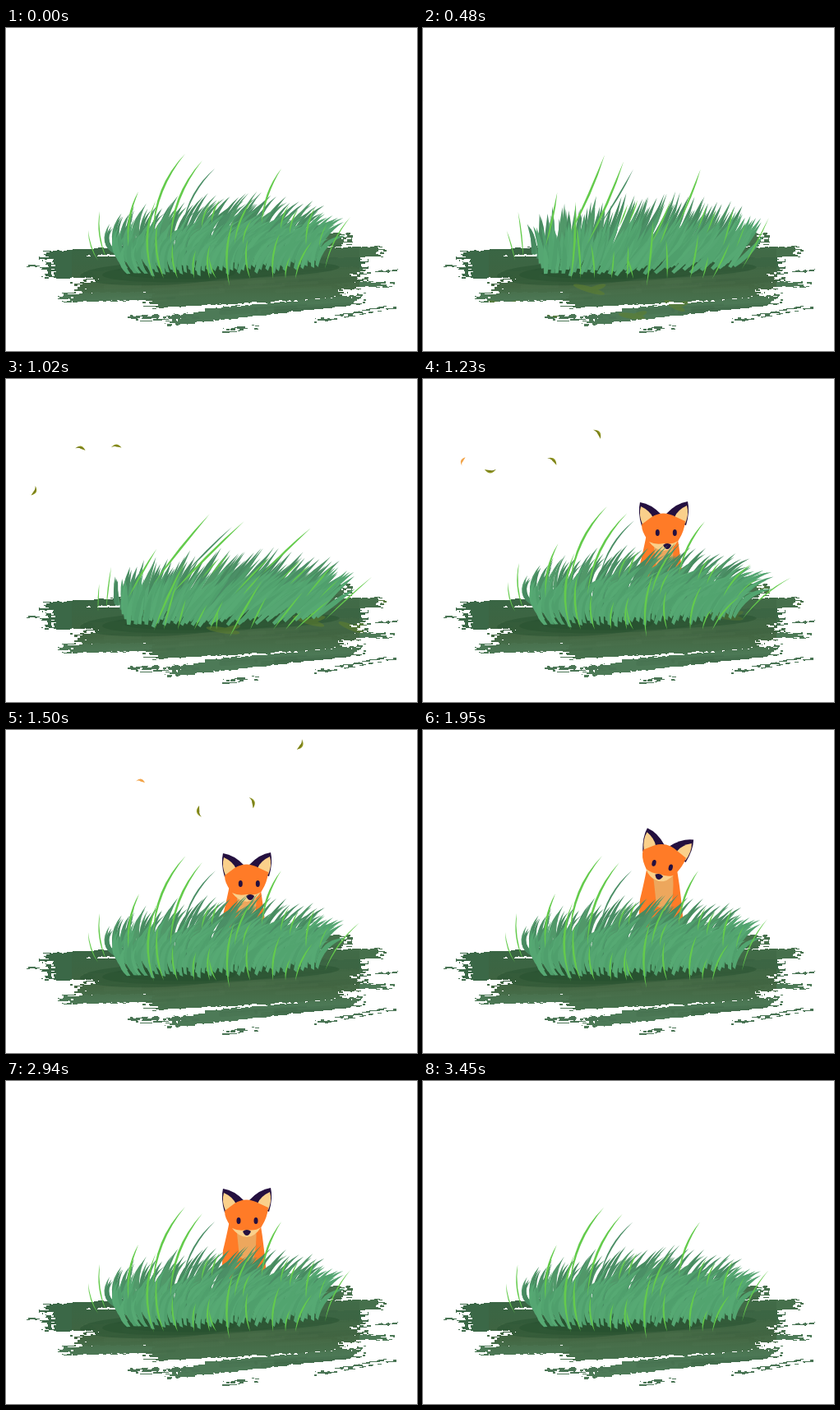
Write an HTML page with a canvas that moves like this. It is 500x393 px and loops after 3.51 s.

```html
<!DOCTYPE html>
<html lang="en">
<head>
<meta charset="utf-8">
<title>Fox in the grass</title>
<style>
html, body { margin: 0; width: 100%; height: 100%; overflow: hidden; background: #fff; }
canvas { display: block; width: 500px; height: 393px; }
</style>
</head>
<body>
<canvas id="stage" width="500" height="393"></canvas>
<script>
const LOOP = 3510, STEP = 30;
const stage = document.getElementById('stage');
const ctx = stage.getContext('2d');

const lerp = (a, b, u) => a + (b - a) * u;
const clamp = (v, a = 0, b = 1) => Math.min(b, Math.max(a, v));
const ramp = (t, a, b) => { const u = clamp((t - a) / (b - a)); return u * u * (3 - 2 * u); };
const pulse = (t, a, b, c, d) => ramp(t, a, b) * (1 - ramp(t, c, d));

let seed = 7;
function rnd() {
  seed = (seed * 16807) % 2147483647;
  return seed / 2147483647;
}

// Ground: dry brush strokes, painted once

function hash(x, y) {
  const v = Math.sin(x * 127.1 + y * 311.7) * 43758.5453;
  return v - Math.floor(v);
}

function grain(x, y) {
  const i = Math.floor(x), j = Math.floor(y), u = x - i;
  return lerp(hash(i, j), hash(i + 1, j), u);
}

function dryStroke(g, color, cover, x0, y0, x1, y1, half) {
  g.fillStyle = color;
  for (let x = x0; x <= x1; x++) {
    const mid = lerp(y0, y1, (x - x0) / (x1 - x0));
    const ends = Math.min(x - x0, x1 - x) / 26 + 0.2;
    for (let y = Math.round(mid - half); y <= mid + half; y++) {
      const side = (half - Math.abs(y - mid)) / 2.6 + 0.2;
      if (grain(x / 4, y / 1.5) < Math.min(ends, side, cover)) g.fillRect(x, y, 1, 1);
    }
  }
}

function paintGround() {
  const c = document.createElement('canvas');
  c.width = 500; c.height = 393;
  const g = c.getContext('2d');
  const wet = (color, ...s) => dryStroke(g, color, 2, ...s);
  const dry = (...s) => dryStroke(g, '#4a7555', .52, ...s);
  const dark = '#3b6847', mid = '#46704c', pale = '#4d7a57';

  wet(dark, 40, 276, 190, 267, 5);
  wet(dark, 42, 287, 440, 284, 10);
  wet(dark, 43, 299, 432, 297, 6);
  wet(mid, 360, 258, 423, 257, 9);
  wet(mid, 340, 274, 462, 271, 7);
  wet(mid, 78, 316, 440, 310, 8);
  wet(mid, 92, 306, 436, 300, 11);
  wet(pale, 380, 313, 472, 311, 4);
  wet(pale, 63, 328, 240, 324, 6);
  wet(mid, 165, 331, 415, 317, 11);
  wet(pale, 193, 356, 437, 329, 7);
  wet(pale, 230, 347, 400, 333, 6);
  dry(25, 289, 50, 290, 2);
  dry(424, 298, 479, 295, 2);
  dry(148, 353, 235, 350, 4);
  dry(263, 368, 307, 363, 3);
  dry(375, 356, 474, 338, 3);

  g.globalCompositeOperation = 'source-atop';
  const tint = g.createLinearGradient(0, 265, 0, 345);
  tint.addColorStop(0, 'rgba(56,98,64,.35)');
  tint.addColorStop(.6, 'rgba(66,98,62,.7)');
  tint.addColorStop(1, 'rgba(77,122,87,0)');
  g.fillStyle = tint;
  g.fillRect(80, 262, 350, 85);
  g.lineCap = 'round';
  for (let i = 0; i < 40; i++) {
    const x = lerp(90, 360, rnd()), y = lerp(280, 352, rnd()), w = lerp(40, 110, rnd());
    g.strokeStyle = i % 2 ? 'rgba(46,84,52,.13)' : 'rgba(88,128,92,.1)';
    g.lineWidth = lerp(2, 6, rnd());
    g.beginPath();
    g.moveTo(x, y);
    g.lineTo(x + w, y - w * .06);
    g.stroke();
  }
  g.fillStyle = 'rgba(34,76,42,.42)';
  for (let i = 0; i < 3; i++) {
    g.beginPath();
    g.ellipse(185 + 45 * i, 299 - 2 * i, 95 + 18 * i, 14 - 2 * i, -.03, 0, 7);
    g.fill();
  }
  return c;
}

// Leaf shadows slide over the painted ground only

const shades = Array.from({ length: 9 }, (_, i) => ({
  x: 306 - i * 52,
  y: 338 + 18 * Math.sin(i * 2.3) - i,
  r: lerp(14, 22, rnd()),
  turn: lerp(.05, .5, rnd())
}));

function drawShades(t) {
  const alpha = pulse(t, 90, 460, 950, 1650) * .55;
  if (!alpha) return;
  ctx.save();
  ctx.globalCompositeOperation = 'source-atop';
  ctx.globalAlpha = alpha;
  ctx.fillStyle = '#5f7f2b';
  for (const s of shades) {
    const x = s.x + (t - 480) * .5, y = s.y - (t - 480) * .08;
    ctx.beginPath();
    ctx.ellipse(x, y, s.r, 3.5, s.turn, 0, 7);
    ctx.ellipse(x + 9, y - 2, s.r * .6, 3, -.3, 0, 7);
    ctx.fill();
  }
  ctx.restore();
}

// Grass: lens-shaped blades; wind moves the tip and straightens the curve

const blade = (x, y, tx, ty, bow, w, color, push, foot = 0) =>
  ({ x, y, tx, ty, bow, w, color, push, foot, h: y - ty, phase: rnd() * 6 });

function tuft() {
  const blades = [];
  const back = ['#4b8f66', '#519869', '#478a60'];
  const front = ['#52a46f', '#56a973', '#4f9f6c', '#55a672'];
  const lean = u => lerp(-13, 26, clamp(u * 2.2)) + rnd() * 12;
  for (let i = 0; i < 95; i++) {
    const u = (i * .618034) % 1, x = lerp(134, 368, u);
    const top = 231 - 35 * Math.sin(Math.PI * (u * .8 + .1)) + rnd() * 24;
    blades.push(blade(x, 274 + rnd() * 8, x + lean(u), top, 9 + rnd() * 4,
      2.7 + rnd() * 1.6, back[i % 3], .3, 2));
  }
  for (let i = 0; i < 150; i++) {
    const u = (i * .618034 + .3) % 1, x = lerp(143, 380, u);
    const y = lerp(276, 299, i / 150) - 8 * u * u + rnd() * 4;
    blades.push(blade(x, y, x + lean(u), y - 34 - rnd() * 24, 8 + rnd() * 4,
      3 + rnd() * 1.7, front[i % 4], .3, 2.2));
  }
  blades.push(blade(215, 240, 254, 171, 8, 1.8, '#4b8f66', .4));
  return blades;
}

function brightBlade(x, y, tx, ty, push = .5) {
  const h = y - ty;
  const w = clamp(1.2 + h / 70, 1.4, 2.5) * (x < 130 || x > 380 ? .65 : 1);
  return blade(x, y, tx, ty, h * .09 + (h > 90 ? 3 : 0), w, '#64cb4c', push);
}

// long blades carry both ends; short ones share a foot line or a height
const long = [
  [112, 283, 100, 246, .65], [122, 280, 114, 223, .42], [149, 266, 161, 199],
  [179, 250, 218, 153, .45], [180, 306, 182, 210], [200, 263, 239, 161, .72],
  [272, 314, 277, 233], [278, 262, 300, 208], [311, 238, 335, 171, .58],
  [365, 265, 376, 218], [388, 293, 419, 230, .41]
];
const low = [
  [192, 184, 238], [209, 203, 262], [229, 231, 270], [248, 248, 264], [256, 247, 278],
  [297, 294, 257], [325, 333, 250], [340, 346, 278], [352, 372, 260]
];
const high = [[238, 214], [250, 209], [288, 234], [334, 216], [345, 221], [381, 238]];
const bright = [
  ...long.map(p => brightBlade(...p)),
  ...low.map(([x, tx, ty]) => brightBlade(x, 305, tx, ty)),
  ...high.map(([x, ty]) => brightBlade(x, ty + 29, x + 10, ty))
];

function wind(t, x, phase) {
  const d = Math.max(0, x - 100);
  const late = 330 * Math.pow(d / 285, 8) + d * .3;
  const gust = pulse(t, 470 + d * .15, 720 + d * .1, 890 + late, 1180 + late);
  const lead = .07 * pulse(t, 60, 420, 500, 700);
  const flutter = .045 * Math.sin(t / 75 + phase) * pulse(t, 480, 650, 1300, 1750);
  const after = .1 * pulse(t, 1000, 1200, 1250, 1600);
  const idle = t > 1950 && t < 2940 ? .04 * Math.sin(Math.PI * (t - 1950) / 495) ** 2 : 0;
  const rustle = .05 * pulse(t, 3200, 3400, 3455, 3510);
  return gust + lead + flutter + after + idle + rustle;
}

function drawBlade(b, t) {
  const k = wind(t, b.x, b.phase);
  const flat = pulse(t, 200, 480, 920, 1200);
  const tx = b.tx + k * b.push * b.h, ty = b.ty + k * .17 * b.h * (b.foot ? .5 : 1);
  const len = Math.hypot(tx - b.x, ty - b.y);
  const nx = (ty - b.y) / len, ny = -(tx - b.x) / len;
  const bow = 1.6 * b.bow * lerp(1, -.2, flat);
  const cx = (b.x + tx) / 2 + nx * bow, cy = (b.y + ty) / 2 + ny * bow;
  const wx = nx * b.w * 1.1, wy = ny * b.w * 1.1, fx = nx * b.foot, fy = ny * b.foot;
  ctx.fillStyle = b.color;
  ctx.beginPath();
  ctx.moveTo(b.x + fx, b.y + fy);
  ctx.quadraticCurveTo(cx + wx, cy + wy, tx, ty);
  ctx.quadraticCurveTo(cx - wx, cy - wy, b.x - fx, b.y - fy);
  ctx.fill();
}

// Fox

const ORANGE = '#ff7b27', CREAM = '#fad08b', INK = '#24103f';

function shape(color, d) {
  ctx.fillStyle = color;
  ctx.fill(new Path2D(d));
}

function dot(x, y, rx, ry) {
  ctx.fillStyle = INK;
  ctx.beginPath();
  ctx.ellipse(x, y, rx, ry, 0, 0, 7);
  ctx.fill();
}

function ear() {
  shape(INK, 'M264 131 Q278 133 290 146 L280 155 L266 160 Q261 143 264 131 Z');
  shape(CREAM, 'M265 136 Q276 141 280 150 L267 158 Q262 146 265 136 Z');
}

function drawFox(t) {
  const up = ramp(t, 1070, 1200), rise = ramp(t, 1660, 1820), duck = ramp(t, 3060, 3290);
  if (!up || duck === 1) return;
  const tilt = pulse(t, 1760, 1900, 2690, 2870);
  const drop = lerp(95, 19, up) - 19 * rise + 95 * duck;
  const look = 1 - ramp(t, 1640, 1800);

  ctx.save();
  ctx.beginPath();
  ctx.rect(240, 90, 100, 162);
  ctx.clip();
  ctx.translate(0, drop);
  shape(ORANGE, 'M272 170 Q268 190 264 206 L261 252 L318 252 Q315 205 309 170 Z');
  shape('#eda75d', 'M280 176 L304 176 Q306 200 300 222 L284 214 Z');

  ctx.translate(293 - 6 * tilt, 184 - 6 * tilt);
  ctx.rotate(tilt * .265);
  ctx.translate(-293, -184);
  ear();
  ctx.save();
  ctx.translate(586, -1);
  ctx.scale(-1, 1);
  ear();
  ctx.restore();
  shape(ORANGE, 'M266 158 L278 149 Q292 140 308 149 L319 154 Q318 166 311 177 Q303 190 293 190 Q281 188 273 176 Q266 167 266 158 Z');
  shape(CREAM, 'M275 179 Q283 183 293 181 Q303 183 310 178 Q303 190 293 190 Q282 189 275 179 Z');
  const shift = 2.3 * look;
  for (const x of [283, 304]) dot(x + shift, 170 - look * 2, 2.5, 4);
  shape(INK, `M${288 + shift * 1.8} 183 q5 -4 10 0 q-2 5 -5 5 q-3 0 -5 -5 Z`);
  ctx.restore();
}

// Leaves: way points as [time, x, y]

const OLIVE = '#92981f';
const leaf = (color, turn, spin, path) => ({ color, turn, spin, path });
const leaves = [
  leaf(OLIVE, .9, 240, [[450, -9, 85], [750, 49, 91], [1230, 213, 66], [1460, 335, 19], [1740, 510, 40]]),
  leaf(OLIVE, .65, 480, [[640, -10, 60], [750, 28, 54], [1230, 158, 99], [1850, 510, 60]]),
  leaf(OLIVE, 3.1, 190, [[680, -10, 172], [750, 15, 174], [1230, 82, 112], [1900, 510, 90]]),
  leaf('#f2a449', -1.2, 200, [[1020, -10, 128], [1230, 48, 100], [1560, 200, 58], [1930, 510, 80]])
];

function along(path, t) {
  const i = path.findIndex(p => p[0] > t);
  if (i < 1) return null;
  const p = j => path[clamp(j, 0, path.length - 1)];
  const [a, b, c, d] = [p(i - 2), p(i - 1), p(i), p(i + 1)];
  const span = c[0] - b[0], u = (t - b[0]) / span;
  const slope = (m, n, k) => (n[k] - m[k]) / (n[0] - m[0]) * span;
  return [1, 2].map(k => {
    const m0 = slope(a, c, k), m1 = slope(b, d, k), u2 = u * u, u3 = u2 * u;
    return (2 * u3 - 3 * u2 + 1) * b[k] + (u3 - 2 * u2 + u) * m0 +
      (3 * u2 - 2 * u3) * c[k] + (u3 - u2) * m1;
  });
}

function drawLeaf({ color, turn, spin, path }, t) {
  const at = along(path, t);
  if (!at) return;
  const size = lerp(.65, color === OLIVE ? 1 : .8, ramp(t, 700, 1200));
  ctx.save();
  ctx.translate(...at);
  ctx.rotate(turn + (t - 1230) / spin);
  ctx.scale(size, size);
  shape(color, 'M-7 2 Q0 -7 7 2 Q1 1 0 1 Q-3 -1 -7 2 Z');
  if (color === OLIVE) shape('#6f741c', 'M-7 2 Q0 -4 7 2 Q0 -1.5 -7 2 Z');
  ctx.restore();
}

const ground = paintGround();
const grass = [...tuft(), ...bright];

function draw(now) {
  const t = Math.floor((now % LOOP) / STEP) * STEP;
  ctx.clearRect(0, 0, 500, 393);
  ctx.drawImage(ground, 0, 0);
  drawShades(t);
  drawFox(t);
  for (const b of grass) drawBlade(b, t);
  for (const l of leaves) drawLeaf(l, t);
}

const start = performance.now();
function tick() {
  draw(Math.max(0, performance.now() - start));
  requestAnimationFrame(tick);
}
tick();
</script>
</body>
</html>
```
